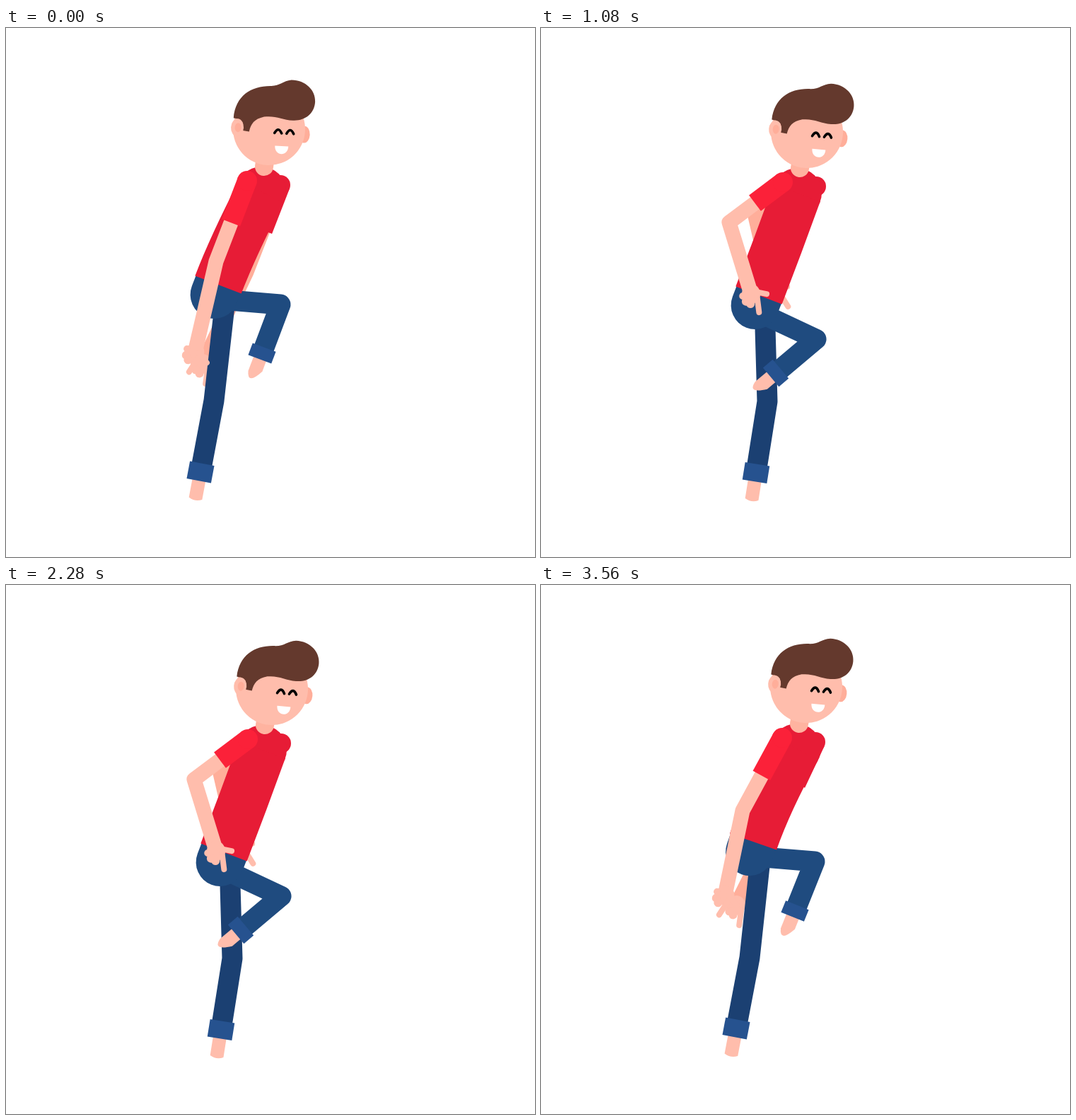
An HTML page with a canvas that plays this animation: 748x748 px, repeating every 3600 ms.

```html
<!DOCTYPE html>
<html>
<head>
<meta charset="utf-8">
<style>
  html, body { margin: 0; width: 100%; height: 100%; overflow: hidden; background: #fff; }
  canvas { display: block; }
</style>
</head>
<body>
<canvas id="stage" width="748" height="748"></canvas>
<script>
const ctx = document.getElementById('stage').getContext('2d');
const CYCLE = 1200, STEP = 40;
const SKIN = '#ffbdac', SKIN_DARK = '#ffae9a', SHIRT = '#e71c36', SLEEVE = '#fb2139', SLEEVE_DARK = '#dd1831';
const JEANS = '#1f4b7f', JEANS_DARK = '#1b4072', CUFF = '#26528f', HAIR = '#64392d';

const clamp = v => Math.max(0, Math.min(1, v));
const lerp = (a, b, k) => a + (b - a) * k;

// Smooth periodic curve through rows of values at the given times.
function track(times, rows) {
  const keys = times.map((t, i) => ({ t, v: rows[i] })).sort((a, b) => a.t - b.t);
  const n = keys.length;
  const at = i => {
    const k = keys[(i + n) % n];
    return { t: k.t + CYCLE * Math.floor(i / n), v: k.v };
  };
  return t => {
    let i = n - 1;
    while (keys[i].t > t) i--;
    const [a, b, c, d] = [at(i - 1), at(i), at(i + 1), at(i + 2)];
    const h0 = b.t - a.t, h = c.t - b.t, h2 = d.t - c.t, u = (t - b.t) / h;
    return b.v.map((p, j) => {
      const q = c.v[j], s = (q - p) / h;
      const m0 = ((p - a.v[j]) / h0 * h + s * h0) / (h0 + h);
      const m1 = (s * h2 + (d.v[j] - q) / h2 * h) / (h + h2);
      return p + (q - p) * u * u * (3 - 2 * u) + h * u * (1 - u) * (m0 * (1 - u) - m1 * u);
    });
  };
}

// chest, spine bend, hem, head centre, head tilt
const body = track([0, 40, 160, 480, 600, 640, 760, 1080, 1160], [
  [361, 231, 322, 306, 300, 363, 372, 143, 3],
  [360, 230, 320, 305, 300, 362, 370, 141, 1],
  [335, 286, 296, 346, 316, 409, 323, 199, -16],
  [371, 236, 342, 308, 312, 380, 391, 154, 10],
  [368, 231, 328, 306, 304, 364, 386, 143, 7],
  [365, 229, 325, 305, 302, 362, 379, 139, 3],
  [335, 286, 296, 346, 316, 409, 324, 199, -16],
  [362, 233, 336, 305, 308, 378, 376, 147, 5],
  [361, 231, 320, 306, 300, 363, 375, 144, 5]
]);

// knee, cuff
const stride = [
  [388, 391, 362, 460], [427, 485, 419, 562], [392, 520, 374, 627], [317, 532, 317, 626],
  [320, 528, 304, 629], [295, 527, 276, 627], [294, 527, 275, 628], [291, 552, 250, 632],
  [302, 535, 232, 572], [335, 507, 243, 535], [405, 472, 329, 484], [389, 440, 332, 488],
  [387, 391, 359, 461]
];
const nearLeg = track([0, 160, 300, 480, 520, 600, 640, 760, 880, 960, 1040, 1080, 1160], stride);
const farLeg = track([640, 760, 900, 1040, 1080, 1160, 0, 160, 280, 360, 480, 520, 600], stride);

// elbow, palm, pointing angle
const armTrack = (down, swing, point, pull, tuckA, tuckB, drop) =>
  track([0, 80, 160, 360, 480, 560, 600, 680, 760, 960, 1080, 1160],
    [down, swing, point, pull, tuckB, drop, down, swing, point, pull, tuckA, drop]);
const nearArm = armTrack(
  [297, 330, 267, 459, 125], [338, 365, 375, 425, 50], [358, 367, 443, 309, -27], [300, 345, 375, 330, 10],
  [266, 275, 297, 376, 85], [276, 275, 271, 385, 117], [285, 319, 260, 439, 125]);
const farArm = armTrack(
  [340, 345, 278, 475, 100], [385, 360, 420, 430, 45], [410, 348, 518, 319, -27], [350, 345, 428, 330, -5],
  [302, 262, 328, 375, 60], [302, 272, 297, 385, 100], [335, 335, 276, 453, 100]);

function line(color, width, points, cap = 'round') {
  ctx.strokeStyle = color;
  ctx.lineWidth = width;
  ctx.lineCap = cap;
  ctx.lineJoin = 'round';
  ctx.beginPath();
  points.forEach(p => ctx.lineTo(...p));
  ctx.stroke();
}

function oval(color, x, y, rx, ry = rx) {
  ctx.fillStyle = color;
  ctx.beginPath();
  ctx.ellipse(x, y, rx, ry, 0, 0, 7);
  ctx.fill();
}

function placed(x, y, angle, draw) {
  ctx.save();
  ctx.translate(x, y);
  ctx.rotate(angle);
  draw();
  ctx.restore();
}

function leg(hip, [kx, ky, ax, ay], color) {
  const flat = clamp((ay - 570) / 50), cuff = 18 + 7 * flat;
  line(color, 29, [hip, [kx, ky], [ax, ay]], 'butt');
  placed(ax, ay, Math.atan2(ay - ky, ax - kx), () => {
    ctx.fillStyle = SKIN;
    ctx.beginPath();
    ctx.moveTo(0, -9.5);
    ctx.lineTo(0, 9.5);
    ctx.lineTo(lerp(30, 38, flat), 9.5);
    ctx.quadraticCurveTo(lerp(50, 43, flat), lerp(4, 0, flat), lerp(24, 38, flat), -9.5);
    ctx.fill();
    ctx.fillStyle = CUFF;
    ctx.fillRect(-cuff / 2, -17.5, cuff, 35);
  });
}

function arm([sx, sy], [ex, ey, px, py, angle], skin, sleeve) {
  const end = [lerp(sx, ex, .52), lerp(sy, ey, .52)];
  line(skin, 21, [end, [ex, ey], [px, py]]);
  placed(px, py, angle * Math.PI / 180, () => {
    oval(SKIN, 0, 0, 14, 13);
    line(SKIN, 8, [[0, -8], [27, -9]]);
    line(SKIN, 8, [[-3, -5], [2, -22]]);
    oval(SKIN, 14, 2, 6);
    oval(SKIN, 10, 8, 6);
    oval(SKIN, 2, 12, 5);
  });
  line(sleeve, 28, [[sx, sy], end], 'butt');
  oval(sleeve, sx, sy, 14);
}

const hairSide = 'M-49 11C-56 -30 -35 -58 -10 -61C8 -63 26 -60 36 -66C45 -75 67 -68 67 -50C67 -32 56 -19 44 -19' +
  'C30 -18 22 -22 8 -19C-6 -16 -12 -8 -15 2L-22 4L-24 -6L-40 10Z';
const hairFront = 'M-51 -13C-50 -45 -28 -60 0 -61C12 -62 16 -69 28 -71C48 -72 63 -58 63 -42C63 -25 50 -14 33 -14' +
  'C18 -14 8 -20 -8 -17C-22 -13 -26 -6 -28 5L-37 4L-38 -8L-44 -12Z';

function mixPaths(a, b, k) {
  const target = b.match(/-?\d+/g);
  let i = 0;
  return new Path2D(a.replace(/-?\d+/g, v => lerp(+v, +target[i++], k).toFixed(2)));
}

function eye(x) {
  ctx.strokeStyle = '#000';
  ctx.lineWidth = 3.6;
  ctx.lineCap = 'round';
  ctx.beginPath();
  ctx.moveTo(x - 5, 5);
  ctx.quadraticCurveTo(x, -5, x + 5, 5);
  ctx.stroke();
}

function head(turn) {
  const ear = -31 - 14 * turn, mouth = 32 - 13 * turn, half = 8 + 1.5 * turn;
  oval(SKIN_DARK, 38 + 12 * turn, 5, 8, 12);
  oval(SKIN, 0, 0, 51);
  ctx.fillStyle = HAIR;
  ctx.fill(mixPaths(hairSide, hairFront, turn));
  oval(SKIN, ear, 0, 9, 12.5);
  oval(SKIN_DARK, ear + 1, 0, 4.5, 6.5);
  eye(27 - 14 * turn);
  eye(41 - 11 * turn);
  ctx.fillStyle = '#fff';
  ctx.beginPath();
  ctx.moveTo(mouth - half, 23);
  ctx.lineTo(mouth + half, 23);
  ctx.bezierCurveTo(mouth + half, 38, mouth - half, 38, mouth - half, 23);
  ctx.fill();
}

function draw(time) {
  const t = Math.floor(time / STEP) * STEP % CYCLE;
  const turn = clamp(.5 + .68 * Math.cos((t - 20) / CYCLE * 2 * Math.PI));
  const [sx, sy, bx, by, mx, my, hx, hy, tilt] = body(t);
  const reach = 15 / Math.hypot(mx - bx, my - by);
  const px = mx + (mx - bx) * reach, py = my + (my - by) * reach;

  ctx.fillStyle = '#fff';
  ctx.fillRect(0, 0, 748, 748);
  arm([sx + 10 + 17 * turn, sy - 1 - 8 * turn], farArm(t), SKIN_DARK, lerp(0, 1, turn) > .5 ? SHIRT : SLEEVE_DARK);
  leg([px + 14, py + 20 * turn], farLeg(t), JEANS_DARK);
  leg([px - 11 + 8 * turn, py + 6], nearLeg(t), JEANS);
  line(JEANS, 68, [[mx, my], [px, py]]);

  oval(SHIRT, sx, sy, 35);
  ctx.strokeStyle = SHIRT;
  ctx.lineWidth = 70;
  ctx.lineCap = 'butt';
  ctx.beginPath();
  ctx.moveTo(sx, sy);
  ctx.quadraticCurveTo(bx, by, mx, my);
  ctx.stroke();

  line('#ffb3a0', 26, [[sx + 4, sy - 35], [lerp(sx + 4, hx, .3), lerp(sy - 35, hy, .3)]]);
  placed(hx, hy, tilt * Math.PI / 180, () => head(turn));
  arm([sx - 8 - 12 * turn, sy - 5 - 10 * turn], nearArm(t), SKIN, SLEEVE);
}

const start = performance.now();
function tick() {
  draw(performance.now() - start);
  requestAnimationFrame(tick);
}
tick();
</script>
</body>
</html>
```
